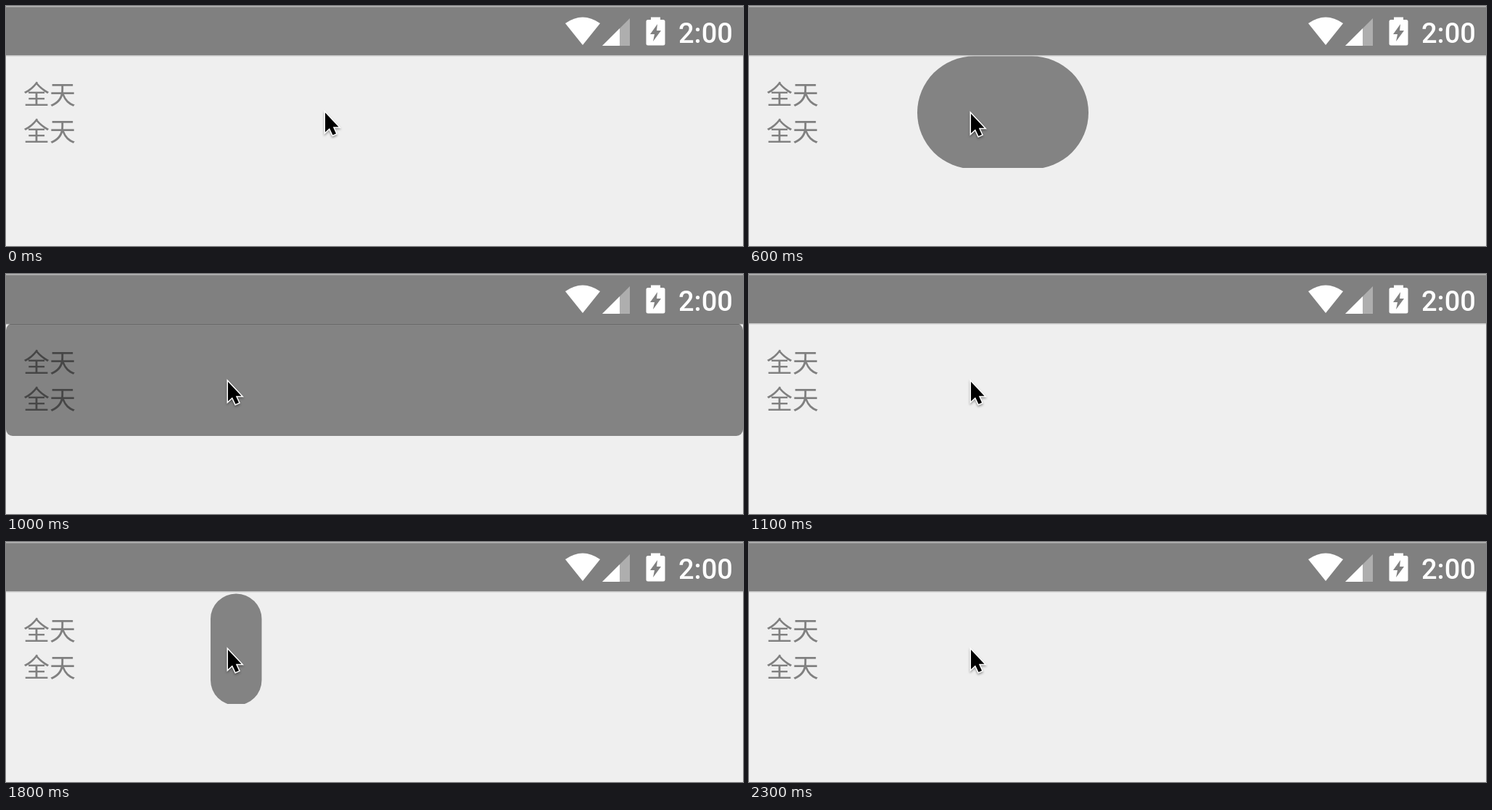
An HTML page that plays this animation: 1016 px wide and 332 px high, repeating every 2.4 s.

```html
<!DOCTYPE html>
<html lang="zh-CN">
<head>
<meta charset="utf-8">
<style>
  html, body { margin: 0; width: 100%; height: 100%; overflow: hidden; background: #efefef; }
  svg { display: block; width: 1016px; height: 332px; }
  .clock { font: 500 38px Roboto, sans-serif; fill: #fff; }
  .label { font: 36px "Noto Sans CJK SC", "Noto Sans CJK", sans-serif; fill: #808080; }
  #cursor { filter: drop-shadow(0 2px 1.5px rgba(0, 0, 0, .35)); }
</style>
</head>
<body>
<svg viewBox="0 0 1016 332">
  <clipPath id="row"><rect y="69" width="1016" height="155"/></clipPath>
  <rect width="1016" height="332" fill="#efefef"/>
  <rect width="1016" height="69" fill="#808080"/>
  <rect width="1016" height="1.5" fill="#b8b8b8"/>
  <rect id="edge" y="68" width="1016" height="1.5" fill="#c4c4c4"/>

  <g fill="#fff">
    <path d="M771 24Q795 7 819 24L795 54Z"/>
    <path d="M822 55L860 17V55Z" opacity=".36"/>
    <path d="M822 55L846 31V55Z"/>
    <path d="M889 15.5H902V19H906Q908.500 19 908.500 21.500V52Q908.500 54.500 906 54.500H885Q882.500 54.500 882.500 52V21.500Q882.500 19 885 19H889Z"/>
  </g>
  <path d="M898 25L888 39H894L892 49L903 34H897Z" fill="#808080"/>
  <text class="clock" x="927" y="50.500">2:00</text>

  <text class="label" x="24" y="136">全天</text>
  <text class="label" x="24" y="187">全天</text>

  <g clip-path="url(#row)"><rect id="ripple" fill="#000" fill-opacity=".455"/></g>
  <g id="cursor">
    <path d="M2 4V31L8 25.500L12.500 35L17 33L12.800 23.800H20.500Z" fill="#000" stroke="#fff" stroke-width="3" paint-order="stroke"/>
  </g>
</svg>
<script>
  const LOOP = 2400;
  const $ = id => document.getElementById(id);

  // [start ms, x, y]
  const moves = [[0, 438, 143.500], [100, 405, 144], [200, 330, 145], [300, 304, 145]];

  // [start ms, x, y, width, height, radius]
  const full = [0, 68.500, 1016, 155.500, 9];
  const ripples = [
    [0], [600, 232, 69.500, 236, 156, 78], [700, ...full], [1100],
    [1800, 282, 71.500, 70.500, 154.500, 35], [1900, ...full], [2300]
  ];

  const at = (steps, t) => steps.findLast(s => s[0] <= t);

  function draw(now) {
    const t = now % LOOP;
    const [, cx, cy] = at(moves, t);
    $('cursor').setAttribute('transform', `translate(${cx} ${cy})`);

    const [, x = 0, y = 0, width = 0, height = 0, rx = 0] = at(ripples, t);
    for (const [name, value] of Object.entries({ x, y, width, height, rx }))
      $('ripple').setAttribute(name, value);
    $('edge').setAttribute('fill', width === 1016 ? '#868686' : '#c4c4c4');

    requestAnimationFrame(draw);
  }
  draw(performance.now());
</script>
</body>
</html>
```
